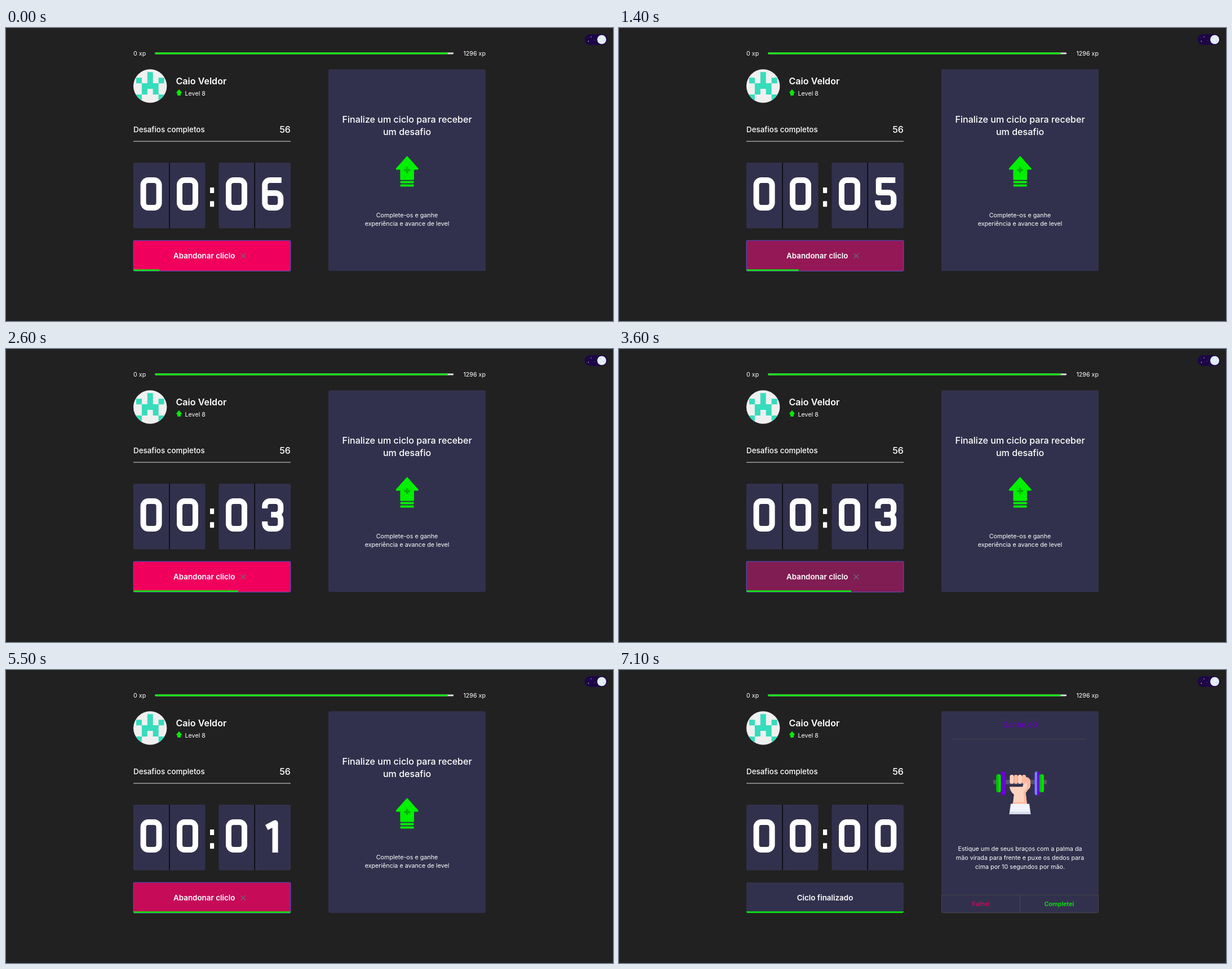
Animation of 1077 by 520 pixels, one loop 8 s. Source, as an HTML page:

```html
<!DOCTYPE html>
<html lang="pt-BR">
<head>
<meta charset="utf-8">
<title>Ciclo</title>
<style>
  html, body { margin: 0; width: 100%; height: 100%; overflow: hidden; background: #212121; }
  svg { display: block; width: 1077px; height: 520px; }
  text { font-family: Inter, Roboto, sans-serif; font-optical-sizing: none; fill: #fff; }
  .s { font-size: 10.72px; }
  .m { font-size: 13.4px; }
  .l { font-size: 16.08px; }
  .w5 { font-weight: 500; }
  .w6 { font-weight: 600; }
  .mid { text-anchor: middle; }
  .end { text-anchor: end; }
  .card { fill: #32314d; }
  .digit { fill: none; stroke: #fff; stroke-width: 10; stroke-linejoin: round; }
</style>
</head>
<body>
<svg viewBox="0 0 1077 520">
  <defs>
    <clipPath id="avatarClip"><circle cx="255.7" cy="103" r="29.7"/></clipPath>
    <clipPath id="buttonClip"><rect x="226" y="377" width="279" height="54.5" rx="3.3"/></clipPath>
  </defs>
  <rect width="1077" height="520" fill="#212121"/>

  <!-- theme switch -->
  <rect x="1026.5" y="11" width="40.5" height="19" rx="9.5" fill="#1d0646"/>
  <g fill="#e8e4f5">
    <circle cx="1038" cy="15.7" r=".7"/><circle cx="1033.3" cy="23.6" r=".8"/>
    <circle cx="1044" cy="22" r=".4"/><circle cx="1032" cy="17.5" r=".3"/>
  </g>
  <circle cx="1057" cy="20.5" r="8" fill="#e6effc"/>
  <g fill="#d5e0f2">
    <circle cx="1054" cy="17.5" r="1.4"/><circle cx="1060" cy="22" r="1.6"/><circle cx="1055" cy="24.5" r="1"/>
  </g>

  <!-- experience -->
  <text class="s" x="226" y="49">0 xp</text>
  <rect x="264.3" y="43.6" width="529.9" height="2.8" rx="1.3" fill="#dcdde0"/>
  <rect x="264.3" y="43.6" width="519.6" height="2.8" rx="1.3" fill="#0be80b"/>
  <text class="s end" x="851" y="49">1296 xp</text>

  <!-- profile -->
  <g clip-path="url(#avatarClip)">
    <rect x="226" y="73" width="60" height="60" fill="#f0f0f0"/>
    <path id="avatar" fill="#37dcbc"/>
  </g>
  <text class="l w6" x="301.5" y="99.8">Caio Veldor</text>
  <path d="M307 109.6L311.4 115H309.4V119.2H304.6V115H302.6Z" fill="#0be80b" stroke="#0be80b" stroke-width="1.2" stroke-linejoin="round"/>
  <text class="s" x="317.5" y="120">Level 8</text>

  <text class="m w5" x="226" y="185.4">Desafios completos</text>
  <text class="l w5 end" x="505" y="186.3">56</text>
  <rect x="226" y="200.6" width="279" height="1" fill="#dcdde0"/>

  <!-- countdown -->
  <rect class="card" x="226" y="239" width="127.5" height="116.5" rx="3.3"/>
  <rect class="card" x="377.5" y="239" width="127.5" height="116.5" rx="3.3"/>
  <rect x="289.3" y="239" width="1.5" height="116.5" fill="#050508"/>
  <rect x="440.4" y="239" width="1.5" height="116.5" fill="#050508"/>
  <rect x="362" y="283" width="7.2" height="10" rx=".8" fill="#fff"/>
  <rect x="362" y="307.2" width="7.2" height="10" rx=".8" fill="#fff"/>
  <g id="digits"></g>

  <!-- cycle button -->
  <rect id="button" x="226" y="377" width="279" height="54.3" rx="3.3"/>
  <g id="running">
    <rect x="226.2" y="377.1" width="278.7" height="54.2" rx="1.8" fill="none" stroke="#5a48b0" stroke-width="1.3"/>
    <text class="m w6" x="297" y="409">Abandonar cliclo</text>
    <path d="M416.6 400.2l8.6 8.6m0-8.6l-8.6 8.6" stroke="#70686f" stroke-width="1.3"/>
  </g>
  <text id="finished" class="m w6 mid" x="365.5" y="409">Ciclo finalizado</text>
  <g clip-path="url(#buttonClip)"><rect id="bar" x="226" y="428.4" height="3" fill="#0be80b"/></g>

  <!-- challenge card -->
  <rect class="card" x="572" y="73.3" width="279" height="357.9" rx="3.3"/>
  <g id="waiting">
    <text class="l w5 mid" x="711.6" y="167.8">Finalize um ciclo para receber</text>
    <text class="l w5 mid" x="711.6" y="190">um desafio</text>
    <g fill="#00f000">
      <path d="M711.7 229.2L730.2 250H722.5V268.2H700.9V250H693.2Z" stroke="#00f000" stroke-width="3" stroke-linejoin="round"/>
      <rect x="699.6" y="271.4" width="24.2" height="4" rx="1.5"/>
      <rect x="699.6" y="277.6" width="24.2" height="4" rx="1.5"/>
    </g>
    <path d="M711.7 246.6v11M706.2 252.1h11" stroke="#00b400" stroke-width="3.6"/>
    <text class="s mid" x="711.5" y="336">Complete-os e ganhe</text>
    <text class="s mid" x="711.5" y="351">experiência e avance de level</text>
  </g>
  <g id="challenge">
    <text class="m w5 mid" x="711.5" y="102.4" style="fill:#6a00c4">Ganhe 80</text>
    <path d="M592 122.4H829M572.5 399.3H850.5M711.5 399.3V431" stroke="#46454f"/>
    <path d="M572.5 399V428q0 2.8 2.8 2.8H847.7q2.8 0 2.8-2.8V399" fill="none" stroke="#46454f"/>

    <rect x="664" y="195" width="95" height="7.6" fill="#55556a"/>
    <rect x="677.6" y="180.3" width="8.6" height="42" rx="3.6" fill="#6c00d6"/>
    <rect x="669.5" y="185" width="8" height="32" rx="3.6" fill="#00e400"/>
    <path d="M673.5 185v32q-4 0-4-4V189q0-4 4-4" fill="#00c000"/>
    <rect x="737.6" y="180.3" width="8.6" height="42" rx="3.6" fill="#6c00d6"/>
    <path d="M741.8 180.3v42q-4.2 0-4.2-4V184q0-4 4.2-4" fill="#7b80ff"/>
    <rect x="746" y="185" width="8" height="32" rx="3.6" fill="#00e400"/>
    <path d="M750 185v32q-4 0-4-4V189q0-4 4-4" fill="#00c000"/>

    <path d="M693 207.2H716Q719 200 719 190H722Q730 191 730 199V204Q730 209 726 212L721.6 218 724 239H698.6L700.8 221Q694 216 693 207.2Z" fill="#ffd3bf"/>
    <path d="M719 190H722Q730 191 730 199V204Q730 209 726 212L721.6 218 724 239H719.6L717.6 217Q724 212 724 204Z" fill="#ffb99e"/>
    <path d="M698.9 234.5H723.5V239H698.4Z" fill="#ffb99e"/>
    <g id="fingers"></g>
    <path d="M695 237.4H728L730.4 256H692.6Z" fill="#f1f4fd"/>
    <path d="M693.2 251.6H729.8L730.4 256H692.6Z" fill="#d6deec"/>

    <text class="s mid" x="711.5" y="321.2">Estique um de seus braços com a palma da</text>
    <text class="s mid" x="711.5" y="337.3">mão virada para frente e puxe os dedos para</text>
    <text class="s mid" x="711.5" y="353.4">cima por 10 segundos por mão.</text>
    <text class="s w6 mid" x="642" y="419" style="fill:#e0005c">Falhei</text>
    <text class="s w6 mid" x="781" y="419" style="fill:#0be80b">Completei</text>
  </g>
</svg>
<script>
const LOOP = 8000, STEP = 100, FADE = 200, TOTAL = 6;
const TICKS = [600, 1600, 2600, 3700, 4700, 5800];
// times at which the pointer leaves or enters the button, alternating
const HOVERS = [40, 1340, 1935, 2340, 2740, 3550, 3705, 5405];
const IDLE = [50, 49, 77], HOVER = [240, 0, 92];

// stroke skeletons, x from the cell centre, y from the digit top
const GLYPHS = [
  'M-5 5H5a9 9 0 0 1 9 9V45a9 9 0 0 1-9 9H-5a9 9 0 0 1-9-9V14a9 9 0 0 1 9-9Z',
  'M-11 14.5L4.3 6.5V59',
  'M-14 18V14a9 9 0 0 1 9-9H5a9 9 0 0 1 9 9V20q0 6-4 10L-13 50V54H19',
  'M-14 18V14a9 9 0 0 1 9-9H5a9 9 0 0 1 9 9V20a9 9 0 0 1-9 9H-3M5 29a9 9 0 0 1 9 9V45a9 9 0 0 1-9 9H-5a9 9 0 0 1-9-9V41',
  'M9.5 3L-15.5 42V44.5H23M11 28V59',
  'M17 5H-12.5V27H5a9 9 0 0 1 9 9V45a9 9 0 0 1-9 9H-5a9 9 0 0 1-9-9V41',
  'M15.5 5H-5a9 9 0 0 0-9 9V45a9 9 0 0 0 9 9H5a9 9 0 0 0 9-9V37a9 9 0 0 0-9-9H-14'
];

const $ = id => document.getElementById(id);
const show = (id, on) => $(id).setAttribute('visibility', on ? 'visible' : 'hidden');

function add(parent, tag, attrs) {
  const node = document.createElementNS('http://www.w3.org/2000/svg', tag);
  for (const key in attrs) node.setAttribute(key, attrs[key]);
  return parent.appendChild(node);
}

function bezier(a, b, s) {
  return 3 * (1 - s) * (1 - s) * s * a + 3 * (1 - s) * s * s * b + s * s * s;
}

function ease(x) {
  if (x <= 0) return 0;
  if (x >= 1) return 1;
  let lo = 0, hi = 1;
  for (let i = 0; i < 20; i++) {
    const s = (lo + hi) / 2;
    if (bezier(0.25, 0.25, s) < x) lo = s; else hi = s;
  }
  return bezier(0.1, 1, lo);
}

function hoverLevel(time) {
  let level = 1;
  HOVERS.forEach((start, i) => {
    if (time < start) return;
    const until = Math.min(time, HOVERS[i + 1] ?? LOOP);
    level += (i % 2 - level) * ease((until - start) / FADE);
  });
  return level;
}

const cells = ['..#..', '#.#.#', '.###.', '.#.#.', '#...#'];
let squares = '';
cells.forEach((row, y) => [...row].forEach((cell, x) => {
  if (cell === '#') squares += `M${231 + x * 9.9} ${78.3 + y * 9.9}h9.95v9.95h-9.95z`;
}));
$('avatar').setAttribute('d', squares);

for (let i = 0; i < 4; i++) {
  add($('fingers'), 'rect', {
    x: 693.4 + i * 7.2, y: 186, width: 7.2, height: 16, rx: 3.4,
    fill: i % 2 ? '#ffb99e' : '#ffd3bf'
  });
}

const digits = [257.6, 322, 409, 473.3].map(x =>
  add($('digits'), 'path', { class: 'digit', transform: `translate(${x} 265)`, d: GLYPHS[0] }));

function render(now) {
  const time = Math.floor(now % LOOP / STEP) * STEP;
  const left = TOTAL - TICKS.filter(tick => time >= tick).length;
  const done = left === 0;
  const level = done ? 0 : hoverLevel(time);
  const color = IDLE.map((c, i) => Math.round(c + (HOVER[i] - c) * level));

  digits[3].setAttribute('d', GLYPHS[left]);
  $('button').setAttribute('fill', `rgb(${color})`);
  $('bar').setAttribute('width', 279 * Math.min(1, (TOTAL + 1 - left) / TOTAL));
  show('running', !done);
  show('finished', done);
  show('waiting', !done);
  show('challenge', done);
}

const origin = performance.now();
function loop() {
  render(performance.now() - origin);
  requestAnimationFrame(loop);
}
loop();
</script>
</body>
</html>
```
